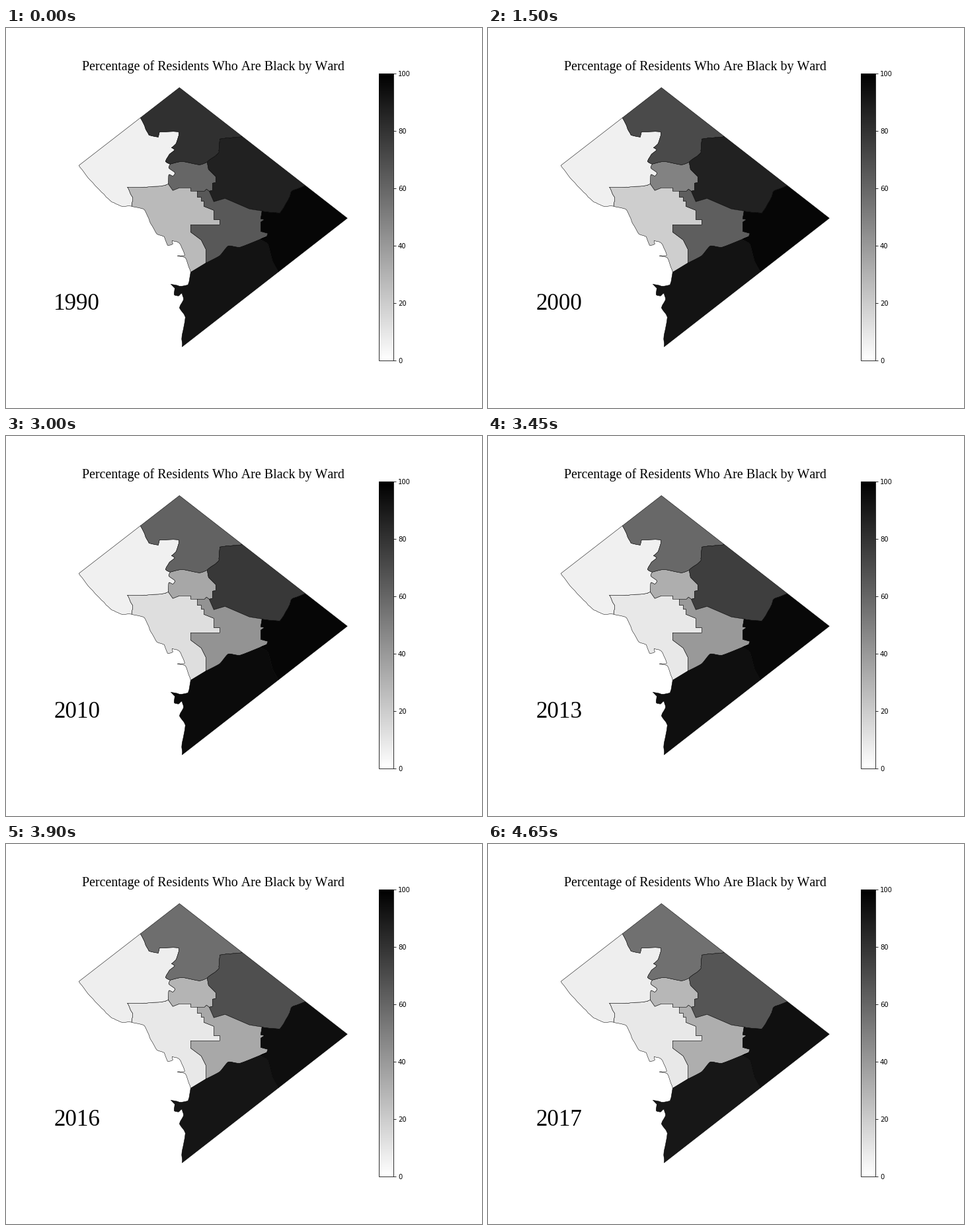
These frames come from a looping animation (720 by 576 pixels, 5050 ms). A matplotlib script:

```python
import numpy as np
import matplotlib.pyplot as plt
from matplotlib.animation import FuncAnimation
from matplotlib.cm import ScalarMappable
from matplotlib.colors import Normalize
from matplotlib.patches import Polygon

WIDTH, HEIGHT = 720, 576
STEP = 50  # ms
rng = np.random.default_rng(4)


def along(a, b, t):
    """Point a fraction t of the way from a to b."""
    return tuple(p + (q - p) * t for p, q in zip(a, b))


def curve(*keys, bend=0.4, rough=0.0, parts=5):
    """Cardinal spline through the key points, roughened between them."""
    keys = np.array(keys, float)
    slopes = bend * (np.vstack([keys[1:], keys[-1:]])
                     - np.vstack([keys[:1], keys[:-1]]))
    path = []
    for p, q, m, n in zip(keys, keys[1:], slopes, slopes[1:]):
        for t in np.arange(parts) / parts:
            point = ((1 + 2 * t) * (1 - t) ** 2 * p + t * (1 - t) ** 2 * m
                     + t * t * (3 - 2 * t) * q + t * t * (t - 1) * n)
            noise = rng.uniform(-rough, rough, 2) if t else 0
            path.append(tuple(point + noise))
    return path + [tuple(keys[-1])]


def stairs(start, *lengths):
    """Steps that alternate between going down and going right."""
    x, y = start
    path = [start]
    for i, length in enumerate(lengths):
        x, y = (x + length, y) if i % 2 else (x, y + length)
        path.append((x, y))
    return path


def ring(*paths):
    """Outline made of paths laid end to end."""
    return [(x + 0.3, y + 0.3) for path in paths for x, y in path]


def rev(path):
    return path[::-1]


# Corners of the district and the ward limits on its straight sides
NORTH, EAST, SOUTH, WEST = (262, 90), (516, 288), (266, 483), (110, 208)
END34 = along(NORTH, WEST, 0.388)
END45 = along(NORTH, EAST, 0.374)
END57 = along(NORTH, EAST, 0.752)
END78 = along(EAST, SOUTH, 0.416)

# Points where three wards, or two wards and the river, meet
J134, J145, J123, J156 = (248, 206), (304, 203), (245, 236), (307, 247)
J126, J567, J678, J268 = (289, 247), (387, 277), (394, 316), (302, 356)
RIVER23, RIVER28 = (190, 270), (279, 370)

# Borders, named after the wards on both sides
B34 = curve(END34, (211, 153), (216, 162), (230, 165), (232, 157), (261, 157),
            (257, 175), (250, 181), (255, 184), (247, 191), (241, 202), J134,
            bend=0.2, rough=0.6, parts=3)
B13 = curve(J134, (246, 212), (255, 219), (252, 224), (246, 222), J123)
B14 = curve(J134, (266, 202), (292, 207), J145, bend=0.3)
B45 = curve(J145, (322, 188), (323, 168), (341, 166), END45, bend=0.1,
            rough=0.6)
B15 = [J145, (306, 214), (317, 225), (317, 234), (312, 235), (312, 246), J156]
B16 = [J156, (303, 244), (300, 247), J126]
B12 = [J123, (252, 246), (262, 242), (279, 242), (279, 247), J126]
B23 = curve(RIVER23, (191, 256), (183, 241), (212, 241), (240, 238), J123,
            bend=0.05, rough=0.7)
B26 = (stairs(J126, 9, 6, 6, 4, 8) + stairs((314, 276), 14, 9, 8, -44, 11)
       + [(295, 321), (302, 335), J268])
B56 = [J156, (314, 263), (331, 258), (368, 274), J567]
B57 = curve(END57, (432, 247), (428, 257), (414, 280), J567, bend=0.1,
            rough=0.6)
B67 = [J567, (385, 289), (391, 290), (385, 294), (385, 308), (396, 311), J678]
B68 = curve(J268, (323, 345), (336, 330), (354, 332), J678, bend=0.25)
B78 = curve(J678, (385, 320), (396, 327), (403, 353), END78, bend=0.2)
SHORE3 = curve(WEST, (124, 227), (141, 245), (157, 261), (172, 269), RIVER23,
               rough=0.6)
SHORE2 = curve(RIVER23, (209, 275), (219, 297), (228, 312), (239, 316),
               (244, 329), (252, 327), (251, 322), (262, 326), (270, 344),
               (259, 345), (271, 348), RIVER28, bend=0.25, rough=0.3)
SHORE8 = curve(RIVER28, (275, 389), (262, 391), (249, 388), (255, 394),
               (254, 404), (260, 406), (266, 402), (268, 412), (262, 424),
               (271, 438), (266, 465), SOUTH, bend=0.2, rough=0.5, parts=3)

WARDS = [
    ring(B14, B15, B16, rev(B12), rev(B13)),
    ring(B23, B12, B26, rev(SHORE2)),
    ring(B34, B13, rev(B23), rev(SHORE3)),
    ring([NORTH], rev(B45), rev(B14), rev(B34)),
    ring(B45, B57, rev(B56), rev(B15)),
    ring(B56, B67, rev(B68), rev(B26), rev(B16)),
    ring([EAST], rev(B78), rev(B67), rev(B57)),
    ring(B68, B78, rev(SHORE8)),
]

# Share of each ward in the survey years; years between are interpolated
SURVEYS = [1990, 2000, 2010, 2013, 2017]
SHARES = [
    (60, 49, 34.5, 32, 28.5),
    (27, 19.5, 13, 9, 9),
    (6, 6, 6, 6, 7),
    (81, 71, 61.5, 59, 56),
    (87, 87, 78, 75.5, 66.5),
    (65.5, 63, 42.5, 40, 32),
    (97.5, 97.5, 97.5, 96.5, 93.5),
    (92.5, 92.5, 95.5, 94, 91),
]

# Each year and how long it stays, in ms
HOLDS = {1990: 1500, 2000: 1500, 2010: 450, 2013: 150, 2014: 300, 2016: 150,
         2017: 1000}
TIMELINE = [year for year, hold in HOLDS.items() for _ in range(hold // STEP)]

plt.rcParams["font.family"] = "DejaVu Sans"
plt.rcParams["text.kerning_factor"] = 6  # whole-pixel kerning
fig = plt.figure(figsize=(10, 8), dpi=72, facecolor="white")
shade = ScalarMappable(Normalize(0, 100), "binary")

ax = fig.add_axes([0, 0, 1, 1])
ax.set(xlim=(0, WIDTH), ylim=(HEIGHT, 0))
ax.axis("off")
patches = [ax.add_patch(Polygon(ward, edgecolor="black", linewidth=0.5))
           for ward in WARDS]
ax.text(313.2, 63.9, "Percentage of Residents Who Are Black by Ward",
        family="Liberation Serif", size=20, ha="center", va="baseline")
year_text = fig.text(0.1, 0.3018, "", family="Liberation Serif", size=35,
                     ha="left", va="top")

bar_ax = fig.add_axes([564.3 / WIDTH, 0.125, 21.74 / WIDTH, 0.755])
bar = fig.colorbar(shade, cax=bar_ax, ticks=range(0, 101, 20))
bar.ax.tick_params(labelsize=10)


def update(i):
    year = TIMELINE[i]
    year_text.set_text(str(year))
    for patch, shares in zip(patches, SHARES):
        patch.set_facecolor(shade.to_rgba(np.interp(year, SURVEYS, shares)))
    return patches + [year_text]


anim = FuncAnimation(fig, update, frames=len(TIMELINE), interval=STEP,
                     repeat=True, repeat_delay=0, blit=False)
plt.show()
```
